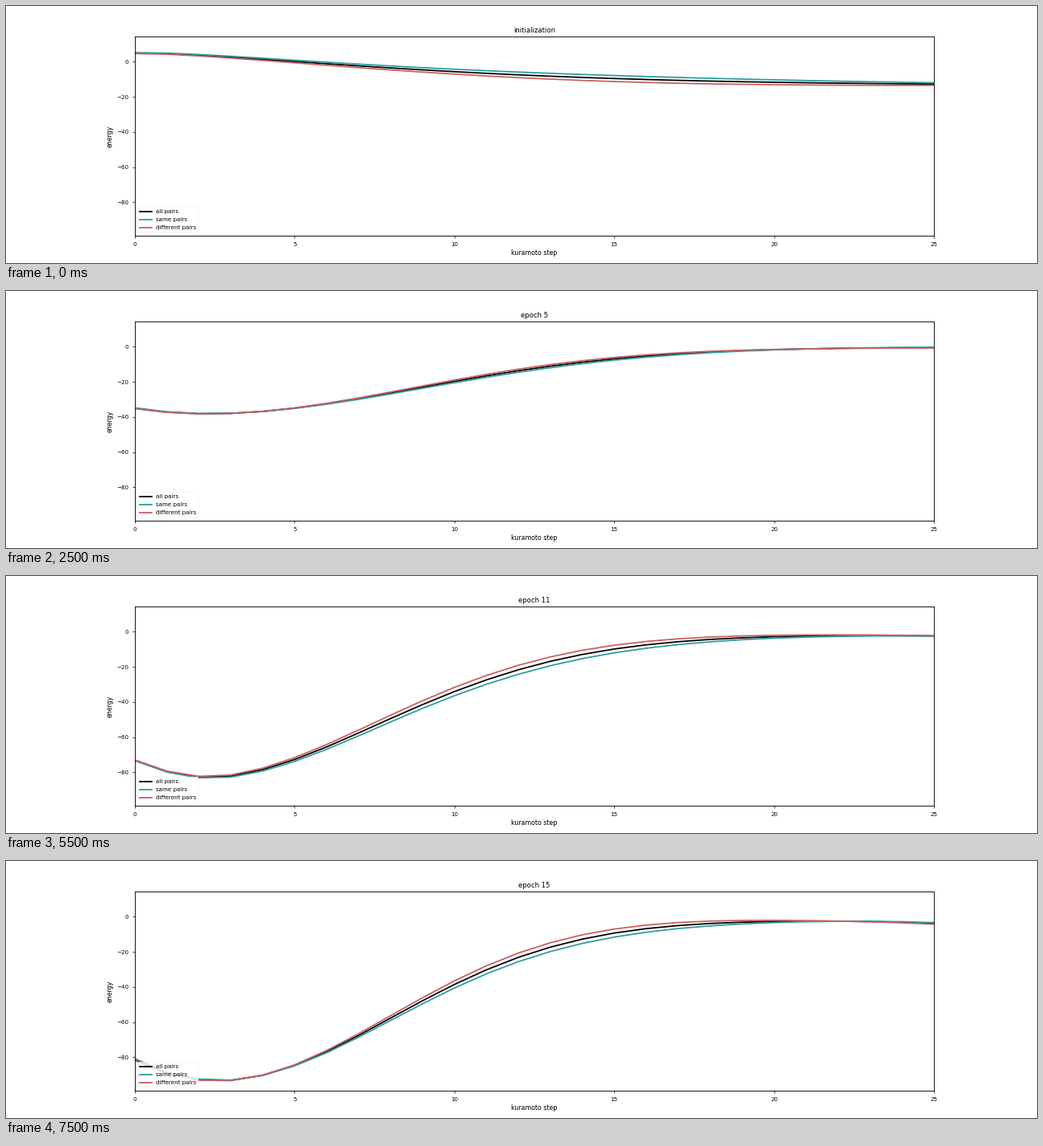
A matplotlib script for the animation above (8000 ms loop, 1280x320 px).

```python
import numpy as np
import matplotlib.pyplot as plt
from matplotlib.animation import FuncAnimation

plt.rcParams.update({
    "font.family": "DejaVu Sans",
    "axes.titlesize": 9.6,
    "axes.labelsize": 8.8,
    "axes.linewidth": 1,
    "xtick.labelsize": 8,
    "ytick.labelsize": 8,
    "legend.fontsize": 8,
    "xtick.major.pad": 5.6,
    "ytick.major.pad": 5.6,
    "patch.linewidth": 0.24,
    "lines.linewidth": 2,
})

EPOCHS = 16
STEPS = np.arange(26)


def track(points):
    """A parameter for every epoch, linear between {epoch: value} points."""
    return np.interp(np.arange(EPOCHS), list(points), list(points.values()))


# The well in the mean energy
FLOOR = track({0: -13.4, 3: -2.4, 5: -0.3, 7: -2.3, 9: -1.4, 15: -1.8})
DEPTH = track({0: -18.6, 3: 9.7, 4: 29.5, 5: 37.9, 6: 36, 7: 53.3, 9: 76.2,
               10: 76, 12: 87, 13: 84, 14: 84.2, 15: 91.6})
CENTER = track({0: 0, 3: 7.1, 5: 2.3, 7: 3, 9: 2.2, 15: 2.6})
WIDTH = track({0: 10.9, 3: 11.1, 5: 9.5, 7: 9, 9: 7.9, 12: 8.1, 15: 7.75})
POWER = track({0: 1.45, 3: 3.8, 5: 1.92, 7: 1.74, 9: 1.74, 15: 1.95})

# Half the gap between same and different pairs
SHIFT = track({0: 0, 3: 0, 5: 0.3, 9: 0.4, 12: -0.2, 15: 0.7})
GAP = track({0: -1.7, 3: 0.5, 7: 1.9, 15: 3.2})
MIDDLE = track({0: 15, 5: 12.5, 7: 7, 9: 10, 12: 13})
SPAN = track({0: 11, 5: 7.5})


def well(center, width, power):
    return np.exp(-(np.abs(STEPS - center) / width) ** power)


def energies(e):
    shape = well(CENTER[e], WIDTH[e], POWER[e])
    start = 0.02 * np.exp(-1.5 * STEPS)
    droop = 2 * (e / 15) ** 3 * (STEPS / 25) ** 10
    mean = FLOOR[e] - DEPTH[e] * (shape - start) - droop
    gap = SHIFT[e] - GAP[e] * well(MIDDLE[e], SPAN[e], 2)
    return mean, mean + gap, mean - gap


fig, ax = plt.subplots(figsize=(20, 5), dpi=64)
fig.subplots_adjust(left=0.125, right=0.9, bottom=0.107, top=0.88)
lines = [ax.plot(STEPS, 0 * STEPS, color=color, label=label)[0]
         for label, color in (("all pairs", "black"),
                              ("same pairs", "#2a9d9f"),
                              ("different pairs", "#c95f5f"))]
title = ax.set_title("initialization")
ax.set(xlim=(0, 25), ylim=(-98.85, 14.1), xlabel="kuramoto step", ylabel="energy",
       xticks=range(0, 26, 5), yticks=range(-80, 1, 20))
ax.legend(loc="lower left", labelspacing=0.58)


def draw(epoch):
    for line, values in zip(lines, energies(epoch)):
        line.set_ydata(values)
    title.set_text(f"epoch {epoch}" if epoch else "initialization")
    return [*lines, title]


anim = FuncAnimation(fig, draw, frames=EPOCHS, interval=500, repeat=True,
                     repeat_delay=0, blit=False)
plt.show()
```
